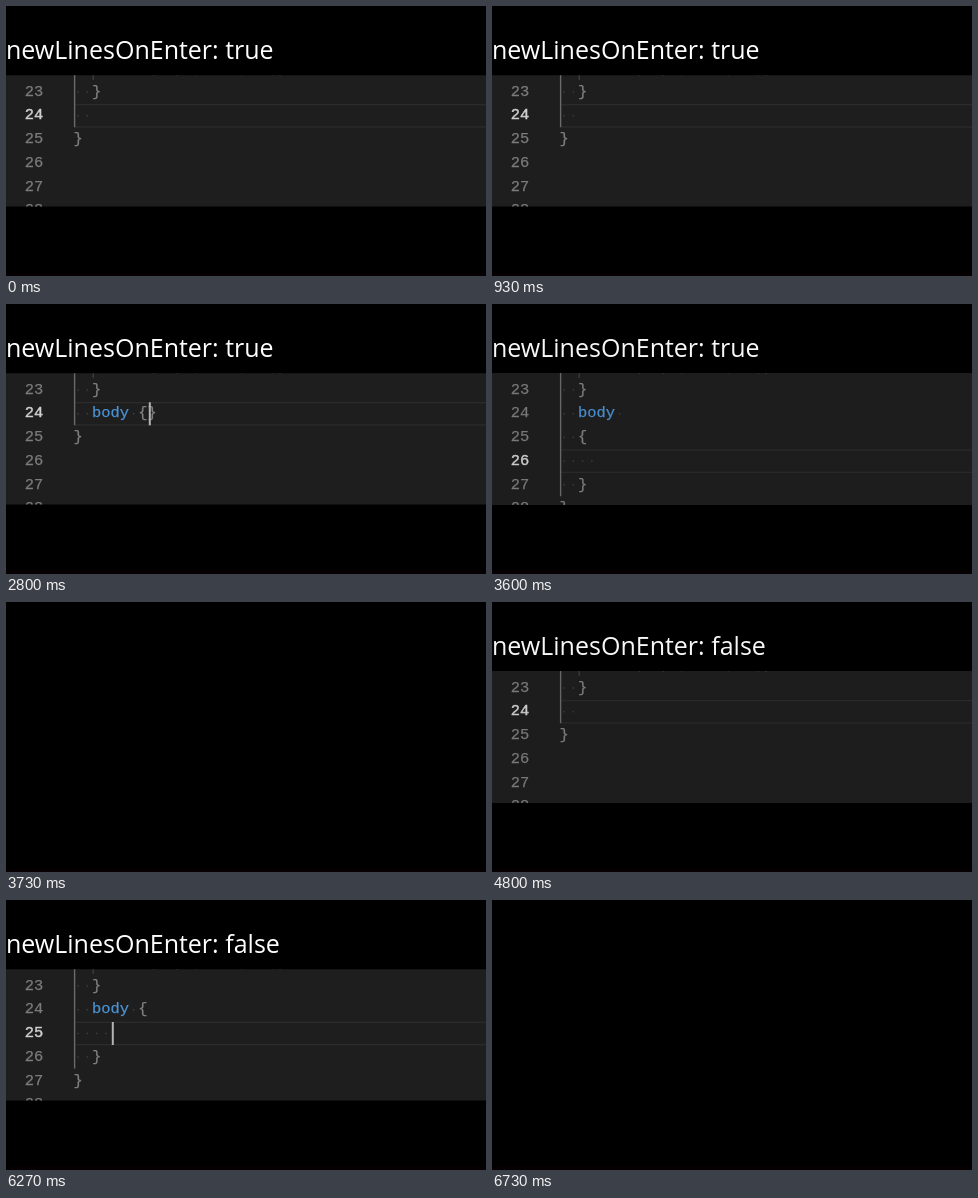
Write an HTML page that moves like this. It is 480 px wide and 270 px high and loops after 7.54 s.

```html
<!DOCTYPE html>
<html lang="en">
<head>
<meta charset="utf-8">
<title>newLinesOnEnter</title>
<style>
  html, body { margin: 0; width: 100%; height: 100%; overflow: hidden; background: #000; }
  svg { display: block; width: 100%; height: 100%; }
  .caption { font: 25px "Open Sans", "Noto Sans", sans-serif; fill: #fff; }
  .code { font: 15.42px "Liberation Mono", "Courier New", monospace; }
  .code text { fill: #808080; stroke: #808080; stroke-width: 0.25; }
  .code .num { fill: #7c7c7c; stroke: #7c7c7c; }
  .code .num.on { fill: #d0d0d0; stroke: #d0d0d0; stroke-width: 0.45; }
  .code .tag { fill: #4b93d4; stroke: #4b93d4; }
  .code .dot { fill: #404040; }
</style>
</head>
<body>
<svg viewBox="0 0 480 270">
  <defs><clipPath id="pane"><rect y="69.3" width="480" height="131.2"/></clipPath></defs>
  <rect width="480" height="270" fill="#000"/>
  <rect y="267" width="480" height="3" fill="#070003"/>
  <g id="scene">
    <text id="caption" class="caption" x="0" y="53"></text>
    <g clip-path="url(#pane)">
      <rect y="69" width="480" height="132" fill="#1e1e1e"/>
      <g id="code" class="code"></g>
      <rect id="caret" width="2" height="23" fill="#b4b4b4"/>
    </g>
  </g>
</svg>
<script>
const LOOP = 7540, LEFT = 67.5, CHAR = 9.25, ROW = 23.7;
const $ = id => document.getElementById(id);
const colX = c => LEFT + c * CHAR;
const rowY = n => 98 + (n - 24) * ROW;

// keys: times at which b, o, d, y, space and the brace pair are typed
const scenes = [
  { from: 0, dim: [3600, 3730], to: 3730, value: "true",
    blink: [[400, 930], [1400, 1870], [2200, 3600]],
    keys: [2200, 2270, 2400, 2470, 2670, 2800], enter: 3130,
    result: ["  body ", "  {", "    ", "  }"], end: [26, 4] },
  { from: 4800, dim: [4800, 4870], to: 6730, value: "false",
    blink: [[4870, 5330], [5530, 6730]],
    keys: [5530, 5600, 5670, 5800, 5930, 6070], enter: 6200,
    result: ["  body {", "    ", "  }"], end: [25, 4] }
];

const within = (t, [a, b]) => t >= a && t < b;
const tag = (name, attrs, body = "") =>
  `<${name} ${Object.entries(attrs).map(([k, v]) => `${k}="${v}"`).join(" ")}>${body}</${name}>`;
const hLine = y => tag("rect", { x: 68, y, width: 412, height: 1.3, fill: "#2b2b2b" });
const guide = (x, end, fill) =>
  tag("rect", { x, y: 69, width: 1.4, height: end - 69, fill });

function lineMarkup(text, n, active) {
  const top = rowY(n), y = top + 15.4, numbered = n > 22;
  let out = "";
  if (numbered) out += tag("text", { class: n === active ? "num on" : "num", x: 18.7, y }, n);
  for (const m of text.matchAll(/\S+/g)) {
    const isTag = numbered && /^[body]+$/.test(m[0]);
    out += tag("text", { class: isTag ? "tag" : "plain", x: colX(m.index), y }, m[0]);
  }
  if (numbered) [...text].forEach((ch, c) => {
    if (ch === " ")
      out += tag("rect", { class: "dot", x: colX(c + 0.5) - 0.7, y: top + 11, width: 1.4, height: 1.4 });
  });
  return out;
}

function codeMarkup(body, active) {
  const lines = ["        (  p y    y  g)", "  }", ...body, "}"];
  while (lines.length < 7) lines.push("");
  const top = rowY(active);
  return hLine(top) + hLine(top + ROW - 1.4)
    + guide(67.9, rowY(24 + body.length) - 0.5, "#6a6a6a")
    + guide(86.5, 74, "#3c3c3c")
    + lines.map((text, i) => lineMarkup(text, 22 + i, active)).join("");
}

let shown = "";
function draw(t) {
  const s = scenes.find(s => within(t, [s.from, s.to]));
  $("scene").style.display = s ? "" : "none";
  if (!s) return;

  const typed = s.keys.filter(k => t >= k).length;
  const entered = t >= s.enter;
  const body = entered ? s.result : ["  " + "body {".slice(0, typed) + (typed > 5 ? "}" : "")];
  const [line, col] = entered ? s.end : [24, 2 + typed];

  const markup = codeMarkup(body, line);
  if (markup !== shown) $("code").innerHTML = shown = markup;
  $("caption").textContent = "newLinesOnEnter: " + s.value;
  $("scene").setAttribute("opacity", within(t, s.dim) ? 0.97 : 1);

  const caret = $("caret");
  caret.setAttribute("x", colX(col) + 1.3);
  caret.setAttribute("y", rowY(line) + 0.3);
  caret.style.display = s.blink.some(b => within(t, b)) ? "" : "none";
}

const start = performance.now();
function tick() {
  draw((performance.now() - start) % LOOP);
  requestAnimationFrame(tick);
}
tick();
</script>
</body>
</html>
```
